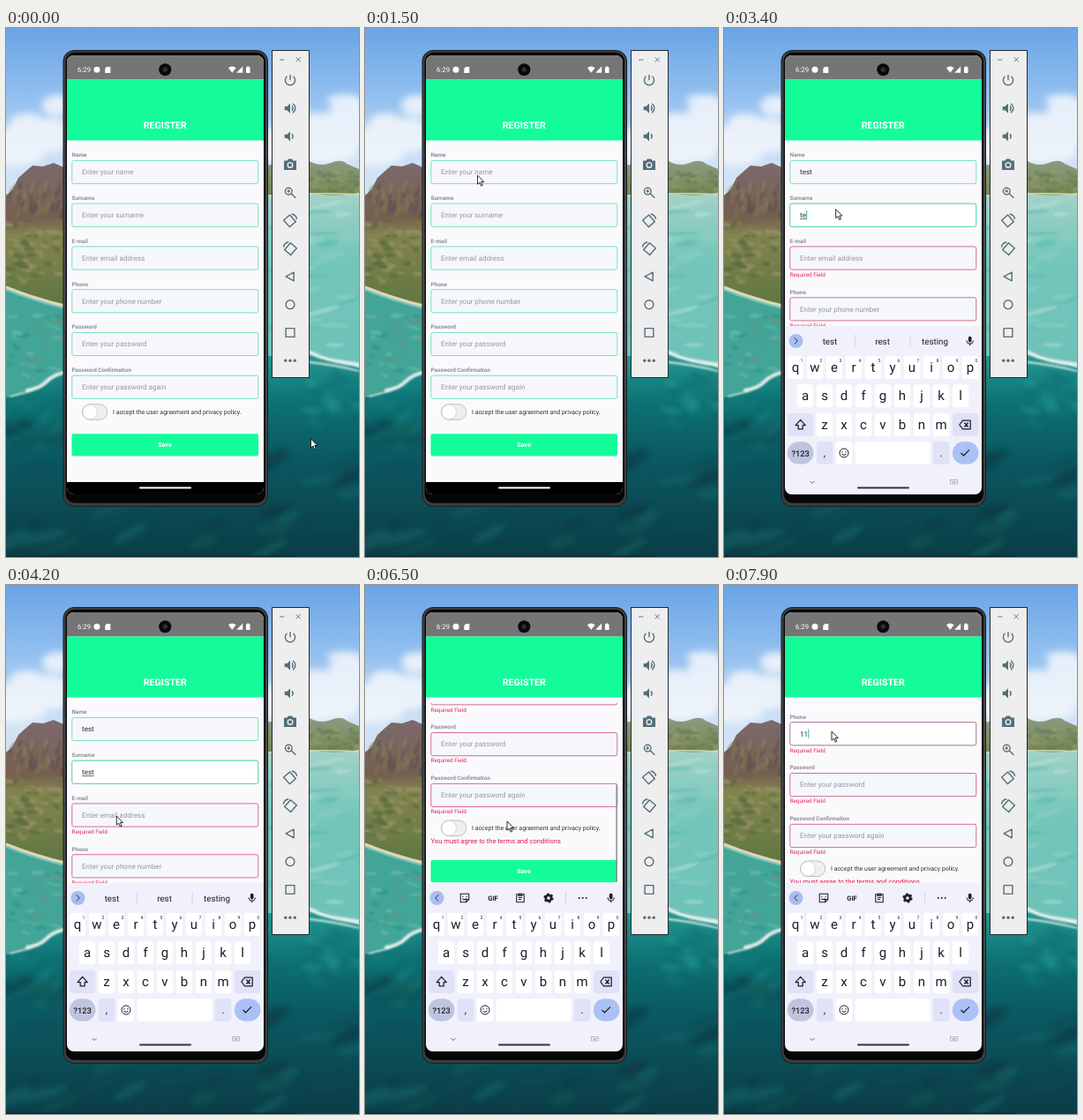
An HTML page for the animation above (8 s loop, 400 by 600 pixels).

```html
<!DOCTYPE html>
<html lang="en">
<head>
<meta charset="utf-8">
<title>Register form</title>
<style>
  html, body { margin: 0; width: 100%; height: 100%; overflow: hidden; }
  svg { position: absolute; inset: 0; width: 100vw; height: 100vh; }
  text { font-family: Roboto, "Noto Sans", sans-serif; white-space: pre; text-rendering: geometricPrecision; }
  .mid { text-anchor: middle; }
  .label { font-size: 6.4px; font-weight: 700; fill: #8c8d98; }
  .value { font-size: 8.1px; }
  .error { font-size: 6.4px; fill: #e0245e; }
  .line { fill: none; stroke: currentColor; stroke-width: 2; stroke-linejoin: round; }
</style>
</head>
<body>
<svg viewBox="0 0 400 600" preserveAspectRatio="none">
  <defs>
    <linearGradient id="sky" x2="0" y2="1">
      <stop stop-color="#69a4e5"/><stop offset=".4" stop-color="#94c0ef"/>
      <stop offset=".8" stop-color="#d0e3f6"/>
    </linearGradient>
    <linearGradient id="cliff" x2="0" y2="1">
      <stop stop-color="#7c6a6c"/><stop offset=".38" stop-color="#755f50"/>
      <stop offset=".5" stop-color="#838450"/><stop offset="1" stop-color="#5f7740"/>
    </linearGradient>
    <linearGradient id="hill" x2="0" y2="1">
      <stop stop-color="#8a9a80"/><stop offset="1" stop-color="#76884f"/>
    </linearGradient>
    <linearGradient id="lagoon" x2="0" y2="1">
      <stop stop-color="#a3d2c8"/><stop offset=".3" stop-color="#74c6ba"/>
      <stop offset=".8" stop-color="#6dc2b8"/><stop offset="1" stop-color="#4bada6"/>
    </linearGradient>
    <linearGradient id="deep" x2="0" y2="1">
      <stop stop-color="#259b93"/><stop offset=".26" stop-color="#0d7073"/>
      <stop offset=".5" stop-color="#0b5a62"/><stop offset="1" stop-color="#0b3d47"/>
    </linearGradient>
    <filter id="soft" x="-50%" y="-50%" width="200%" height="200%"><feGaussianBlur stdDeviation="4"/></filter>
    <filter id="blur"><feGaussianBlur stdDeviation="1"/></filter>
    <filter id="murk"><feGaussianBlur stdDeviation="3"/></filter>
  </defs>
  <g id="scenery"></g>
</svg>
<svg viewBox="0 0 400 600" preserveAspectRatio="none">
  <defs>
    <linearGradient id="metal" x2="0" y2="1">
      <stop stop-color="#3d4043"/><stop offset=".5" stop-color="#505356"/><stop offset="1" stop-color="#3a3d40"/>
    </linearGradient>
    <clipPath id="screen"><rect x="69" y="31" width="223" height="498" rx="8"/></clipPath>
    <clipPath id="page"><rect id="pageBox" x="69" y="133.7" width="223" height="381"/></clipPath>
  </defs>
  <rect x="65" y="25.5" width="231.5" height="517" rx="12" fill="url(#metal)" stroke="#1b1d1f"/>
  <rect x="67.6" y="27.8" width="226.4" height="511" rx="10" fill="#060606"/>
  <g clip-path="url(#screen)">
    <rect x="69" y="31" width="223" height="498" fill="#fafafc"/>
    <rect x="69" y="31" width="223" height="27.5" fill="#757575"/>
    <g fill="#fff">
      <text x="81" y="50" font-size="7.8">6:29</text>
      <circle cx="103" cy="47.3" r="3.5"/>
      <path d="M112.3 46l2-2h4v7h-6zM252 45.2q4.3-3.2 8.6 0l-4.3 5.6zM268.2 43.6v7.2h-7z"/>
      <path d="M272 44.4h1.3v-.9h2v.9h1.3v6.5H272z"/>
    </g>
    <circle cx="180.3" cy="47.2" r="7" fill="#08090b"/>
    <circle cx="180.3" cy="47.2" r="2.6" fill="#25303a"/>
    <g id="form" clip-path="url(#page)"></g>
    <rect x="69" y="58.5" width="223" height="69" fill="#14fc9a"/>
    <text class="mid" x="180.3" y="113.8" font-size="10.7" font-weight="700" fill="#fff">REGISTER</text>
    <rect x="69" y="515" width="223" height="14" fill="#000"/>
    <rect x="151" y="520.4" width="59" height="2" rx="1" fill="#fff"/>
    <g id="keyboard"></g>
  </g>
  <g id="panel"></g>
  <path id="cursor" d="M0 0v10.2l2.4-2.1 1.7 4 1.7-.8-1.7-3.8h3.2z" fill="#fff" stroke="#16181c" stroke-width=".9"/>
</svg>

<script>
const LOOP = 8000;
const $ = id => document.getElementById(id);
const rect = (x, y, w, h, r, fill, more = '') =>
  `<rect x="${x}" y="${y}" width="${w}" height="${h}" rx="${r}" fill="${fill}" ${more}/>`;
const label = (x, y, size, str, more = '') =>
  `<text class="mid" x="${x}" y="${y}" font-size="${size}" ${more}>${str}</text>`;
const icon = (x, y, scale, body) =>
  `<g transform="translate(${x} ${y}) scale(${scale}) translate(-12 -12)">${body}</g>`;
const line = d => `<path class="line" d="${d}"/>`;
const solid = d => `<path fill="currentColor" d="${d}"/>`;

let seed = 11;
const rnd = (a, b) => {
  seed = (seed * 16807) % 2147483647;
  return a + (b - a) * seed / 2147483647;
};
const blots = (n, [x0, x1], [y0, y1], [rx, ry], colors, opacity, tilt = 0, filter = 'blur') =>
  `<g filter="url(#${filter})" opacity="${opacity}">` + Array.from({ length: n }, () => {
    const x = rnd(x0, x1), y = rnd(y0, y1);
    return `<ellipse cx="${x}" cy="${y}" rx="${rnd(.3, 1) * rx}" ry="${rnd(.3, 1) * ry}"
      fill="${colors[Math.floor(rnd(0, colors.length))]}"
      transform="rotate(${tilt + rnd(-12, 12)} ${x} ${y})"/>`;
  }).join('') + '</g>';

function drawScenery() {
  const puffs = [[8, 130, 36, 18], [50, 122, 28, 20], [58, 88, 17, 12], [24, 108, 20, 11], [4, 145, 40, 11],
    [372, 124, 36, 22], [390, 100, 26, 18], [352, 110, 18, 14], [384, 82, 20, 7], [350, 144, 50, 10], [298, 132, 8, 20]];
  $('scenery').innerHTML =
    rect(0, 0, 400, 200, 0, 'url(#sky)') +
    '<g filter="url(#soft)" fill="#f4f7fc" opacity=".85">' +
    puffs.map(([x, y, a, b]) => `<ellipse cx="${x}" cy="${y}" rx="${a}" ry="${b}"/>`).join('') + '</g>' +
    rect(0, 188, 400, 240, 0, 'url(#lagoon)') +
    '<path d="M290 156L344 151Q356 158 368 153T386 154L400 160V187Q370 192 345 187L290 190Z" fill="url(#hill)"/>' +
    blots(50, [344, 400], [162, 185], [5, 2], ['#5d7042', '#9ba070', '#5f7459'], .6) +
    '<path d="M296 190Q360 186 400 189" stroke="#d3d6bb" stroke-width="1.6" fill="none"/>' +
    blots(32, [296, 400], [198, 362], [22, 4], ['#b9e0d8', '#55b8ad', '#8ecfc4'], .5, -8) +
    '<path d="M0 190L7 184 14 170 24 161 30 156 42 157 54 153 70 160V316Q32 307 0 294Z" fill="url(#cliff)"/>' +
    blots(60, [2, 66], [178, 212], [2.2, 9], ['#5a4850', '#957c6c', '#6a564f', '#7e7850'], .6, 15) +
    blots(85, [0, 66], [218, 288], [7, 2.6], ['#4f653a', '#9b9866', '#72843f', '#a5966c'], .6, 8) +
    '<path d="M0 298Q32 311 70 320V402L0 430Z" fill="#43a597"/>' +
    '<path d="M0 294Q32 307 70 316" stroke="#ddd6b8" stroke-width="3.4" fill="none"/>' +
    blots(35, [0, 66], [324, 400], [9, 3], ['#2a908a', '#6fbdac', '#6e9080'], .6, 12) +
    '<path d="M0 419Q20 416 34 407T70 384L300 372 344 367Q376 374 400 386V600H0Z" fill="url(#deep)"/>' +
    blots(50, [0, 400], [430, 595], [34, 9], ['#12696b', '#0a323e', '#135a54', '#0a4a54'], .5, -18, 'murk') +
    blots(25, [344, 400], [394, 450], [16, 5], ['#2aa39b', '#0b7c80', '#0c656c'], .5, 15, 'murk') +
    blots(18, [0, 66], [420, 460], [14, 4], ['#22968f', '#0c6c70'], .5, -20, 'murk') +
    '<g fill="none" stroke="#e6f0ec" stroke-linecap="round" filter="url(#blur)">' +
    '<path d="M24 411Q38 409 46 401T68 390" stroke-width="4"/>' +
    '<path d="M344 368Q366 378 400 382" stroke-width="4.5"/>' +
    '<path d="M344 379Q372 382 400 389M5 418L28 412" stroke-width="1.8"/></g>' +
    rect(0, 598.6, 330, 1.4, 0, '#10262d');
}

function drawPanel() {
  const speaker = 'M3 9v6h4l5 5V4L7 9z';
  const rotate = line('M1.5 11.5L11.5 3 21 14 11 22.5z') + line('M14.5 1.5Q22 3 22.8 10');
  const icons = [
    line('M12 3v9M7 5.5a8 8 0 1 0 10 0'),
    solid(speaker) + line('M15 8q3 4 0 8M16.5 4.5q8 7.5 0 15'),
    solid(speaker) + line('M15 8q3 4 0 8'),
    solid('M2 6h5l2-3h6l2 3h5v15H2z') + '<circle cx="12" cy="13" r="4" fill="none" stroke="#eee" stroke-width="2"/>',
    line('M15 10a5.5 5.5 0 1 0-11 0a5.5 5.5 0 0 0 11 0M14 14l7 7M9.5 7.5v5M7 10h5'),
    rotate,
    `<g transform="matrix(-1 0 0 1 24 0)">${rotate}</g>`,
    line('M18 5v14L5 12z'),
    line('M19 12a7 7 0 1 0-14 0a7 7 0 0 0 14 0'),
    line('M5 5h14v14H5z'),
    [4.5, 12, 19.5].map(x => `<circle cx="${x}" cy="12" r="2.4" fill="currentColor"/>`).join('')
  ];
  $('panel').innerHTML = rect(301.5, 25.5, 42, 371, 0, '#eeeeee', 'stroke="#25292d"') +
    '<path d="M310 36h5.4M328.6 33.2l5.2 5.2M333.8 33.2l-5.2 5.2" stroke="#646b70" stroke-width=".9"/>' +
    '<g color="#546e7a">' + icons.map((d, i) => icon(322, 59.3 + i * 31.8, .7, d)).join('') + '</g>';
}

function drawKeyboard() {
  const ink = '#1d1e25', tint = '#e0e2f8';
  const row = (keys, x0, y) => [...keys].map((k, i) => {
    const x = x0 + i * 22;
    return rect(x - 9.3, y - 13, 18.6, 26, 3.5, '#fff') + label(x, y + 5, 15, k);
  }).join('');
  const strip = (id, chevron, body) =>
    `<g id="${id}"><circle cx="81.5" cy="355" r="8" fill="#a9bdf0"/>${icon(81.5, 355, .45, line(chevron))}${body}</g>`;
  const divider = x => rect(x, 348, .7, 14, 0, '#c9cbd8');
  const mic = icon(278.7, 355, .52, rect(8.5, 2, 7, 13, 3.5, ink) + line('M5 11a7 7 0 0 0 14 0M12 18v4'));
  $('keyboard').innerHTML = `<g fill="${ink}" color="${ink}">` +
    rect(69, 338, 223, 192, 0, '#f0f1fb') +
    strip('words', 'M8 4l8 8-8 8',
      label(120, 358.6, 9.8, 'test') + label(179.5, 358.6, 9.8, 'rest') + label(239, 358.6, 9.8, 'testing') +
      divider(148.2) + divider(210.7)) +
    strip('tools', 'M16 4l-8 8 8 8',
      icon(113, 355, .53, line('M3 3h18v12l-6 6H3zM15 21v-6h6M8 8v2M16 8v2M7 13q4 5 8 0')) +
      label(145, 357.7, 7.6, 'GIF', 'font-weight="700"') +
      icon(176, 355, .53, line('M4 4h16v17H4zM8 3h8v4H8zM8 11h8M8 15h6')) +
      icon(208, 355, .53, '<circle class="line" cx="12" cy="12" r="6" style="stroke-width:5"/>' +
        '<circle class="line" cx="12" cy="12" r="9" style="stroke-width:3;stroke-dasharray:4.7 4.7"/>') +
      divider(227) + [243, 247, 251].map(x => `<circle cx="${x - .3}" cy="355" r="1"/>`).join('')) +
    mic + row('qwertyuiop', 81, 385) + row('asdfghjkl', 92, 417.2) + row('zxcvbnm', 114, 450) +
    [...'1234567890'].map((d, i) => label(88 + i * 22, 379, 5.2, d)).join('') +
    rect(72, 437, 29.5, 26, 3.5, tint) + icon(86.7, 450, .62, line('M12 3L3 13h5v7h8v-7h5z')) +
    rect(258.8, 437, 29.5, 26, 3.5, tint) + icon(273, 450, .62, line('M8 4h14v16H8L2 12zM11 8l7 8M18 8l-7 8')) +
    rect(71.8, 469.3, 29.7, 25.5, 12.7, '#bfc5df') + label(86.7, 485.6, 9.3, '?123', 'font-weight="500"') +
    rect(104.8, 469, 18.6, 26, 3.5, tint) + label(114, 486, 12, ',') +
    rect(126.8, 469, 18.6, 26, 3.5, '#fff') +
    icon(136, 482, .5, '<circle class="line" cx="12" cy="12" r="10"/>' + line('M8 8v3M16 8v3M7 14q5 6 10 0')) +
    rect(148.6, 469, 85, 26, 3.5, '#fff') +
    rect(236.8, 469, 18.6, 26, 3.5, tint) + label(246, 486, 12, '.') +
    rect(258.8, 469.3, 29.7, 25.5, 12.7, '#abc1f6') + icon(273.3, 482, .6, line('M4 12l5 5L20 6')) +
    '<path d="M97.6 514l2.5 2.5 2.5-2.5" fill="none" stroke="#555" stroke-width=".9"/>' +
    rect(256.5, 512.5, 8, 4.5, .6, 'none', 'stroke="#858792" stroke-width="1" stroke-dasharray="1 .7"') +
    rect(258.5, 514.4, 4, 1, 0, '#858792') +
    rect(151, 520.4, 59, 2, 1, '#33343a') + '</g>';
}

const fields = [
  { name: 'Name', hint: 'Enter your name', typed: 'test', start: 2100, focus: 1650 },
  { name: 'Surname', hint: 'Enter your surname', typed: 'test', start: 3250, focus: 2950 },
  { name: 'E-mail', hint: 'Enter email address', typed: 'abc@a.com', start: 4900, focus: 4450 },
  { name: 'Phone', hint: 'Enter your phone number', typed: '11', start: 7550, step: 250, focus: 7150 },
  { name: 'Password', hint: 'Enter your password' },
  { name: 'Password Confirmation', hint: 'Enter your password again' }
];
const PITCH = 48.75, ERROR_GAP = 9.1, PAGE_TOP = 133.7, VALIDATED = fields[0].start;

function drawForm() {
  $('form').innerHTML = fields.map(f => `<g class="field">
      <text class="label" x="74.5" y="2.3">${f.name}</text>
      ${rect(74.8, 6.4, 211, 26.2, 2, '#f6f7fd', 'class="box"')}
      <text class="value" x="86" y="22.4"></text>
      <rect class="under" x="86" y="23.6" height=".7" fill="#333"/>
      <rect class="caret" y="14.2" width=".9" height="10.6" fill="#14b88a"/>
      <text class="error" x="74.5" y="40.3"></text></g>`).join('') +
    `<g id="tail">${rect(86.3, -9.8, 28.4, 17.6, 8.8, '#efeff1', 'stroke="#b9babd" stroke-width=".9"')}
      <circle cx="95.2" cy="-1" r="8.3" fill="#fff" stroke="#c9cacd" stroke-width=".7"/>
      <text x="121" y="1.4" font-size="7" fill="#303038">I accept the user agreement and privacy policy.</text>
      <text id="terms" x="74.5" y="16.2" font-size="7.6" fill="#e0194f">You must agree to the terms and conditions</text>
      <g id="save">${rect(74.5, 23.7, 211.5, 25.3, 2, '#14fc9a')}
      ${label(180, 38.9, 7.2, 'Save', 'font-weight="700" fill="#fff"')}</g></g>
    <rect id="thumb" x="284.4" width="1.5" fill="#8b8b92"/>`;
  document.querySelectorAll('.field').forEach((g, i) => {
    fields[i].node = g;
    for (const part of ['box', 'value', 'under', 'caret', 'error']) fields[i][part] = g.querySelector('.' + part);
  });
}

const ease = p => p * p * (3 - 2 * p);
// Interpolates eased between keys of the form [time, ...values].
function track(keys, t) {
  const i = keys.findIndex(k => k[0] > t);
  if (i < 0) return keys[keys.length - 1].slice(1);
  if (i === 0) return keys[0].slice(1);
  const a = keys[i - 1], b = keys[i], p = ease((t - a[0]) / (b[0] - a[0]));
  return a.slice(1).map((v, j) => v + (b[j + 1] - v) * p);
}
const pointer = [[300, 345.5, 466], [1250, 127.5, 167], [2250, 127.5, 167], [2650, 126.7, 205.5], [3750, 126.7, 205.5],
  [4150, 125.3, 262], [5850, 125.3, 262], [6150, 161, 268], [6750, 161, 268], [7100, 122, 166]];
const scrolling = [[6150, 0], [6450, 187], [6700, 187], [6950, 141]];
const rising = [[1750, 0], [2050, 1]];

const show = (node, on) => node.setAttribute('visibility', on ? 'inherit' : 'hidden');
const move = (node, x, y) => node.setAttribute('transform', `translate(${x} ${y})`);
const set = (node, attrs) => { for (const k in attrs) node.setAttribute(k, attrs[k]); };

function textAt(f, t) {
  if (!f.typed || t < f.start) return '';
  return f.typed.slice(0, 1 + Math.floor((t - f.start) / (f.step || 150)));
}
function errorAt(f, text, t) {
  if (t < VALIDATED) return '';
  if (!text) return 'Required Field';
  if (f.name === 'E-mail' && !/@\w+\.\w\w/.test(text)) return 'Please enter a valid email address';
  return f.name === 'Phone' ? 'Required Field' : '';
}

function render(t) {
  const [scroll] = track(scrolling, t), [rise] = track(rising, t);
  const focused = fields.filter(f => f.focus <= t).pop();
  let y = 144 - scroll;
  for (const f of fields) {
    const text = textAt(f, t), error = errorAt(f, text, t), active = f === focused;
    move(f.node, 0, y);
    f.value.textContent = text || f.hint;
    set(f.value, { fill: text ? '#2b2c36' : '#9496a3' });
    f.error.textContent = error;
    set(f.box, {
      fill: active ? '#fff' : '#f6f7fd',
      stroke: error ? (active ? '#a5729f' : '#d86a94') : active ? '#48cfa2' : '#72e5b9'
    });
    const width = text ? f.value.getComputedTextLength() : 0;
    const count = Math.max(text.length - 1, 0);
    const since = t - (text ? f.start + count * (f.step || 150) : f.focus);
    set(f.caret, { x: 86.3 + width });
    show(f.caret, active && Math.floor(since / 500) % 2 === 0);
    set(f.under, { width });
    show(f.under, active && text && f.typed === 'test');
    y += PITCH + (error ? ERROR_GAP : 0);
  }
  const invalid = t >= VALIDATED;
  move($('tail'), 0, y);
  show($('terms'), invalid);
  move($('save'), 0, invalid ? 11.5 : 0);

  const top = 529 - 191 * rise;
  set($('pageBox'), { height: Math.min(515, top) - PAGE_TOP });
  move($('keyboard'), 0, top - 338);
  const words = focused && focused.typed === 'test' && textAt(focused, t) !== '';
  show($('words'), words);
  show($('tools'), !words);
  set($('thumb'), { y: 128 + scroll * 209 / 396, height: 110 });
  show($('thumb'), t > 6150 && t < 7250);
  move($('cursor'), ...track(pointer, t));
}

drawScenery();
drawPanel();
drawKeyboard();
drawForm();
const begin = performance.now();
function tick() {
  render((performance.now() - begin) % LOOP);
  requestAnimationFrame(tick);
}
tick();
</script>
</body>
</html>
```
